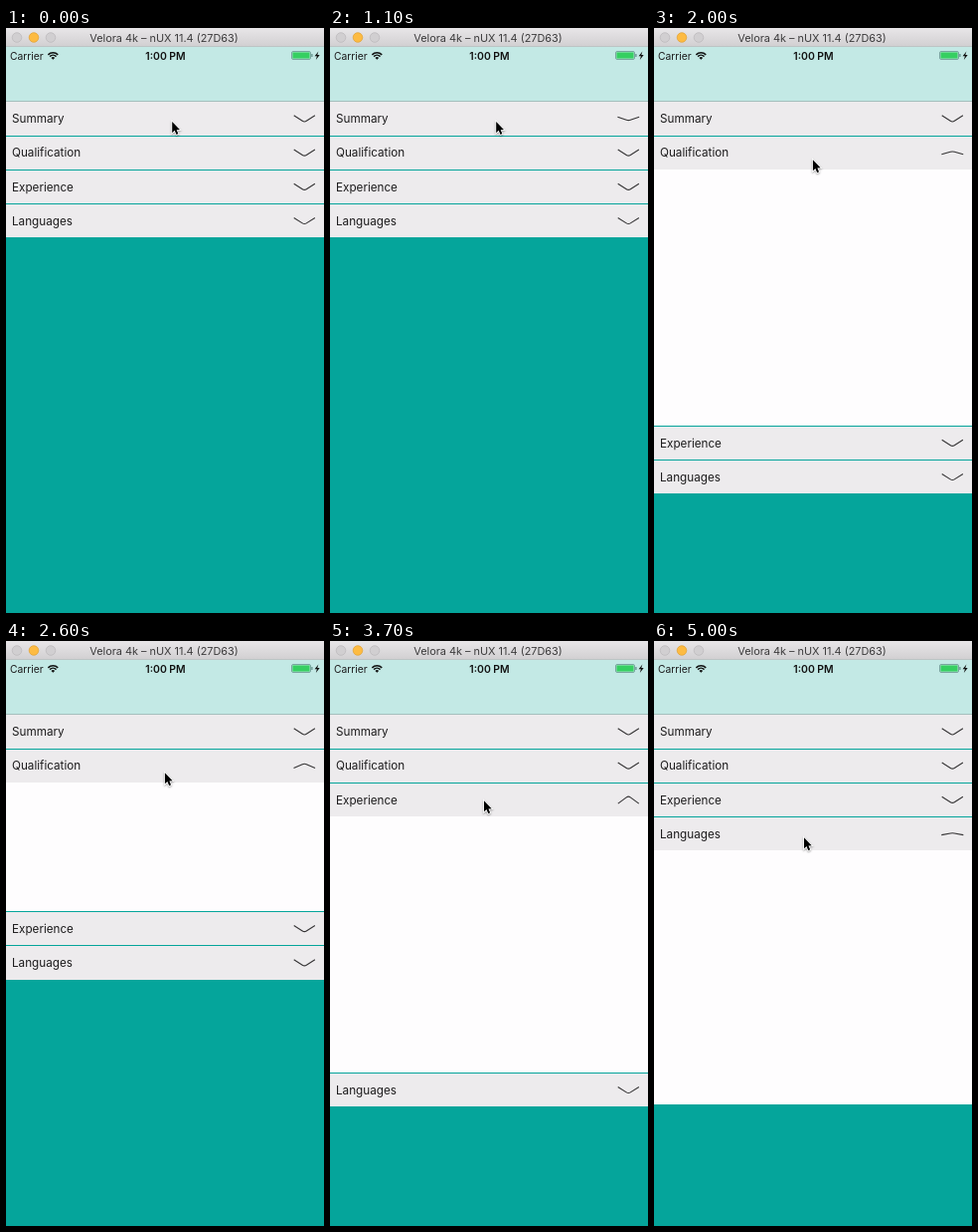
These frames come from a looping animation (320x587 px, 5.1 s). An HTML page with a canvas:

```html
<!DOCTYPE html>
<html lang="en">
<head>
<meta charset="utf-8">
<title>Accordion list</title>
<style>
  html, body { margin: 0; width: 100%; height: 100%; overflow: hidden; background: #05a59b; }
  canvas { display: block; }
</style>
</head>
<body>
<canvas id="stage" width="320" height="587"></canvas>
<script>
const ctx = document.getElementById('stage').getContext('2d');
const LOOP = 5100, STEP = 100;
const TOP = 74.45, ROW = 34.2, PANEL = 257;
const PANEL_MS = 300, ARROW_MS = 500;

const sections = [
  { label: 'Summary', open: 50, close: 750 },
  { label: 'Qualification', open: 1690, close: 2450.6 },
  { label: 'Experience', open: 3080, close: 3820 },
  { label: 'Languages', open: 4715, close: Infinity }
];

// Pointer moves: start, end, destination
const pointerStart = [167.2, 94];
const pointerMoves = [
  [1150, 1480, 159.9, 132.2],
  [2700, 3000, 155, 160.2],
  [4000, 4280, 154.1, 188.2],
  [4400, 4500, 151, 197.2]
];

const ease = (t, start, duration) => {
  const p = Math.min(1, Math.max(0, (t - start) / duration));
  return p * p * (3 - 2 * p);
};

const openness = (s, t, duration) => ease(t, s.open, duration) - ease(t, s.close, duration);

function rect(x, y, w, h, color) {
  ctx.fillStyle = color;
  ctx.fillRect(x, y, w, h);
}

function text(str, x, y, size, color = '#1c1b1c', weight = 400, align = 'left') {
  ctx.font = `${weight} ${size}px Inter, sans-serif`;
  ctx.textAlign = align;
  ctx.fillStyle = color;
  ctx.fillText(str, x, y);
}

function trace(points) {
  ctx.beginPath();
  points.forEach(([x, y]) => ctx.lineTo(x, y));
}

function drawTitleBar() {
  const shade = ctx.createLinearGradient(0, 0, 0, 18);
  shade.addColorStop(0, '#e8e6e8');
  shade.addColorStop(1, '#d2d0d2');
  rect(0, 0, 320, 18, shade);
  rect(0, 18, 320, 1, '#bcc4c4');
  ['#d1cfd1', '#fdbb42', '#d1cfd1'].forEach((color, i) => {
    ctx.beginPath();
    ctx.arc(11 + 17 * i, 9.5, 4.8, 0, 2 * Math.PI);
    ctx.fillStyle = color;
    ctx.fill();
    ctx.lineWidth = 0.7;
    ctx.strokeStyle = i === 1 ? '#e0a032' : '#b9b7b9';
    ctx.stroke();
  });
  text('Velora 4k – nUX 11.4 (27D63)', 159, 13.5, 10.9, '#3c3b3c', 400, 'center');
}

function drawWifi(x, y) {
  ctx.strokeStyle = '#111';
  ctx.lineWidth = 1.5;
  for (const r of [7, 4.5]) {
    ctx.beginPath();
    ctx.arc(x, y, r, -Math.PI * 0.75, -Math.PI * 0.25);
    ctx.stroke();
  }
  ctx.beginPath();
  ctx.moveTo(x, y);
  ctx.arc(x, y, 2.6, -Math.PI * 0.75, -Math.PI * 0.25);
  ctx.fillStyle = '#111';
  ctx.fill();
}

function drawBattery() {
  ctx.beginPath();
  ctx.roundRect(287.5, 23.5, 19, 8, 1.5);
  ctx.lineWidth = 0.7;
  ctx.strokeStyle = '#5b8a83';
  ctx.stroke();
  rect(288.4, 24.4, 17.2, 6.2, '#35cf61');
  rect(307.3, 26, 1.2, 3, '#5b8a83');
  trace([[314.4, 23.5], [310.6, 28.3], [312.9, 28.3], [311.8, 32], [315.7, 27], [313.3, 27]]);
  ctx.fillStyle = '#111';
  ctx.fill();
}

function drawNavigation() {
  rect(0, 19, 320, 54, '#c3e9e5');
  rect(0, 73, 320, 1, '#a5bfbd');
  text('Carrier', 4, 31.5, 10.3);
  drawWifi(47.3, 31.8);
  text('1:00 PM', 160.5, 31.5, 10.4, '#111', 600, 'center');
  drawBattery();
}

// A positive bend points down, a negative one up
function drawChevron(y, bend) {
  const x = 300.3, half = 11.2 - 0.7 * Math.abs(bend), rise = 3.7 * bend;
  ctx.beginPath();
  ctx.moveTo(x - half, y - rise);
  ctx.lineTo(x - 2, y + rise * 0.7);
  ctx.quadraticCurveTo(x, y + rise * 1.1, x + 2, y + rise * 0.7);
  ctx.lineTo(x + half, y - rise);
  ctx.lineWidth = 1.1;
  ctx.strokeStyle = '#353435';
  ctx.stroke();
}

function drawSections(t) {
  let y = TOP;
  for (const s of sections) {
    const panel = PANEL * openness(s, t, PANEL_MS);
    const top = Math.round(y);
    const next = y + ROW + panel;
    // One pixel of background stays visible as the separator
    rect(0, top, 320, Math.round(next) - top - 1, '#fefdfe');
    rect(0, top, 320, Math.round(y + ROW) - top - 1, '#edebed');
    text(s.label, 6, y + 20.7, 11.7);
    drawChevron(y + 16.6, 0.87 - 1.87 * openness(s, t, ARROW_MS));
    y = next;
  }
}

function drawPointer(t) {
  let [x, y] = pointerStart;
  for (const [start, end, toX, toY] of pointerMoves) {
    const p = ease(t, start, end - start);
    x += (toX - x) * p;
    y += (toY - y) * p;
  }
  ctx.save();
  ctx.translate(x, y);
  ctx.scale(0.93, 0.93);
  trace([[0, 0], [0, 12], [2.7, 9.5], [4.6, 13.9], [6.6, 13], [4.8, 8.8], [8.3, 8.6]]);
  ctx.closePath();
  ctx.shadowColor = 'rgba(0,0,0,.35)';
  ctx.shadowBlur = 2;
  ctx.shadowOffsetY = 1;
  ctx.lineWidth = 1.8;
  ctx.strokeStyle = '#fff';
  ctx.stroke();
  ctx.shadowColor = 'transparent';
  ctx.fillStyle = '#000';
  ctx.fill();
  ctx.restore();
}

function draw(t) {
  rect(0, 0, 320, 587, '#05a59b');
  drawTitleBar();
  drawNavigation();
  drawSections(t);
  drawPointer(t);
}

const began = performance.now();
function tick() {
  const t = (performance.now() - began) % LOOP;
  draw(Math.floor(t / STEP) * STEP);
  requestAnimationFrame(tick);
}
tick();
</script>
</body>
</html>
```
